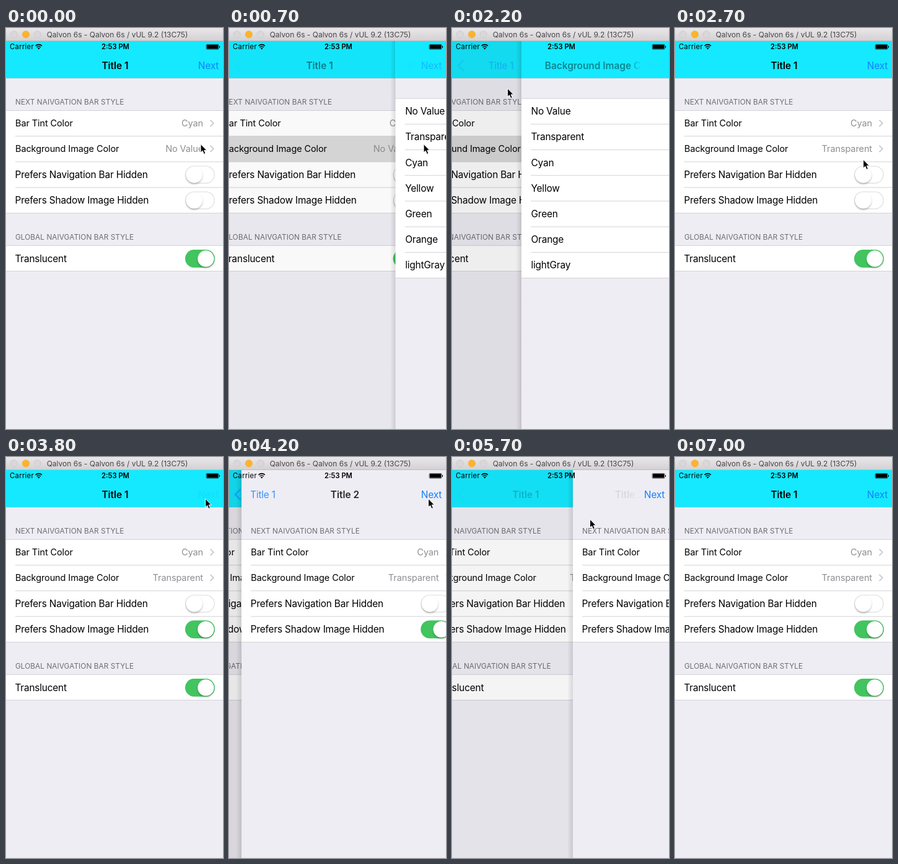
Write an HTML page that moves like this. It is 350 px wide and 644 px high and loops after 7100 ms.

```html
<!DOCTYPE html>
<html lang="en">
<head>
<meta charset="utf-8">
<title>Navigation bar demo</title>
<style>
html, body { margin: 0; width: 100%; height: 100%; overflow: hidden; background: #efedf4; }
svg { display: block; width: 350px; height: 644px; font-family: Inter, Roboto, sans-serif; }
text { white-space: pre; }
.body { font-size: 15.4px; letter-spacing: -.19px; }
.cell { font-size: 14.5px; letter-spacing: -.1px; }
.bold { font-size: 15.4px; font-weight: 600; letter-spacing: .01px; }
.head { font-size: 11.8px; letter-spacing: .06px; fill: #6d6d72; }
.gray { fill: #8e8e93; }
.blue { fill: #1182ff; }
.mid { text-anchor: middle; }
.end { text-anchor: end; }
</style>
</head>
<body>
<svg id="stage" viewBox="0 0 350 644" xmlns="http://www.w3.org/2000/svg">
  <defs>
    <linearGradient id="chrome" x2="0" y2="1">
      <stop stop-color="#e9e7e9"/><stop offset="1" stop-color="#d3d1d3"/>
    </linearGradient>
    <linearGradient id="edge">
      <stop stop-opacity="0"/><stop offset="1" stop-opacity=".12"/>
    </linearGradient>
    <linearGradient id="fade" gradientUnits="userSpaceOnUse" x1="285" x2="305">
      <stop stop-color="#fff"/><stop offset="1" stop-color="#000"/>
    </linearGradient>
    <mask id="titleMask" maskUnits="userSpaceOnUse" x="0" y="21" width="350" height="60">
      <rect y="21" width="350" height="60" fill="url(#fade)"/>
    </mask>
    <filter id="drop" x="-30%" y="-30%" width="160%" height="170%">
      <feDropShadow dx="0" dy="2" stdDeviation="1.6" flood-opacity=".28"/>
    </filter>
  </defs>
  <g id="main"></g>
  <rect id="dim" y="21" width="350" height="623"/>
  <g id="list"></g>
  <g id="two"></g>
  <g id="nav"></g>
  <g id="chromeBar"></g>
  <path id="cursor" d="M0 0V13.6L3.1 10.8 5.3 16 7.8 14.9 5.6 9.9H9.8Z" stroke="#fff" stroke-width="1" stroke-linejoin="round"/>
</svg>
<script>
const LOOP = 7100, STEP = 100, ROW = 41.2;
const $ = id => document.getElementById(id);
const set = (id, name, value) => $(id).setAttribute(name, value);
const alpha = (id, value) => set(id, 'opacity', value);
const shift = (id, x, y = 0) => set(id, 'transform', `translate(${x} ${y})`);

const text = (x, y, cls, str, extra = '') => `<text x="${x}" y="${y}" class="${cls}" ${extra}>${str}</text>`;
const rect = (x, y, w, h, fill, extra = '') =>
  `<rect x="${x}" y="${y}" width="${w}" height="${h}" fill="${fill}" ${extra}/>`;
const line = (x, y) => rect(x, y - .5, 350 - x, 1, '#d3d2d6');

// White block of rows with full outer lines and inset inner ones
function group(y, count, under = '') {
  let out = rect(0, y, 350, ROW * count, '#fff') + under;
  for (let i = 0; i <= count; i++) out += line(i % count ? 15 : 0, y + i * ROW);
  return out;
}

const cyanBar = rect(0, 21, 350, 59.5, '#14e9ff') + rect(0, 80.4, 350, .6, '#000', 'opacity=".2"');
const page = cyan => rect(0, 21, 350, 623, '#efedf4') + (cyan ? cyanBar : '');
const shadow = rect(-9, 21, 9, 623, 'url(#edge)');

function toggle(id, cy) {
  return `<g transform="translate(289 ${cy - 14.3})">
    <rect x=".7" y=".7" width="46.4" height="27.4" rx="13.7" fill="#fff" stroke="#e3e3e5" stroke-width="1.4"/>
    <rect id="${id}Fill" width="47.8" height="28.8" rx="14.4" fill="#42c45f"/>
    <circle id="${id}Knob" cx="14.5" cy="14.4" r="13.1" fill="#fff" filter="url(#drop)"/></g>`;
}

function valueRow(y, label, value, id) {
  return text(15, y + 5.2, 'cell', label) +
    text(318, y + 5.2, 'cell gray end', value, `id="${id}"`) +
    `<path d="M329.5 ${y - 5.2}l5.2 5.2-5.2 5.2" fill="none" stroke="#c7c7cc" stroke-width="1.7"/>`;
}

function settings(id, under) {
  return text(15, 123, 'head', 'NEXT NAIVGATION BAR STYLE') +
    group(132.5, 4, under) +
    valueRow(153, 'Bar Tint Color', 'Cyan', id + 'Tint') +
    valueRow(194, 'Background Image Color', 'Transparent', id + 'Image') +
    text(14.5, 240.8, 'body', 'Prefers Navigation Bar Hidden') +
    text(14.5, 282, 'body', 'Prefers Shadow Image Hidden') +
    toggle(id + 'Bar', 235.5) + toggle(id + 'Line', 276.7);
}

const pressed = (id, y) => rect(0, y, 350, ROW, '#d9d9d9', `id="${id}"`);

$('main').innerHTML = page(true) + settings('a', pressed('rowHit', 132.5 + ROW)) +
  text(15, 340.3, 'head', 'GLOBAL NAIVGATION BAR STYLE') + group(349.3, 1) +
  text(14.5, 375.5, 'body', 'Translucent') + toggle('glass', 370.3);

const colors = ['No Value', 'Transparent', 'Cyan', 'Yellow', 'Green', 'Orange', 'lightGray'];
$('list').innerHTML = shadow + page(true) + group(113.2, 7, pressed('pickHit', 113.2 + ROW)) +
  colors.map((c, i) => text(15.5, 139.2 + i * ROW, 'body', c)).join('') +
  '<path id="check" d="M323.2 134l3.6 3.6 7.6-7.8" fill="none" stroke="#1182ff" stroke-width="1.9"/>';

$('two').innerHTML = shadow + page(false) + settings('b', '');

$('nav').innerHTML =
  '<path id="back" d="M18.8 51.4L10 60.2l8.8 8.8" fill="none" stroke="#1182ff" stroke-width="2.5"/>' +
  text(0, 65.6, 'body blue mid', 'Title 1', 'id="backLabel"') +
  text(0, 65.6, 'bold mid', 'Title 1', 'id="baseTitle"') +
  `<g mask="url(#titleMask)">${text(0, 65.6, 'bold mid', '', 'id="topTitle"')}</g>` +
  text(343, 65.6, 'body blue end', 'Next', 'id="next"');

$('chromeBar').innerHTML = rect(0, 0, 350, 20.5, 'url(#chrome)') + rect(0, 20, 350, .8, '#b9b7b9') +
  [['#d9d7d9', '#cac8ca', 12.8], ['#fdb32d', '#f3ab32', 32], ['#d9d7d9', '#cac8ca', 50.7]]
    .map(([f, s, x]) => `<circle cx="${x}" cy="10.3" r="5.6" fill="${f}" stroke="${s}" stroke-width=".8"/>`).join('') +
  text(179.5, 15, 'mid', 'Qalvon 6s - Qalvon 6s / vUL 9.2 (13C75)', 'font-size="12" fill="#474547"') +
  text(6, 34.3, '', 'Carrier', 'font-size="11.4" letter-spacing=".25"') +
  text(176.5, 34.3, 'mid', '2:53 PM', 'font-size="11.2" font-weight="600"') +
  `<g fill="none" stroke="#000" stroke-width="1.6"><path d="M47.6 28.8a7.4 7.4 0 0 1 10.4 0"/>
   <path d="M49.6 31a4.6 4.6 0 0 1 6.4 0"/></g><path d="M52.8 34.6l-1.9-2a2.8 2.8 0 0 1 3.8 0Z"/>` +
  rect(323, 26.4, 20, 7.8, 'none', 'rx="1.4" stroke="#000" stroke-opacity=".75" stroke-width=".8"') +
  rect(323.8, 27.1, 18.4, 6.4, '#000') + rect(343.8, 28.8, 1.2, 3, '#000', 'rx=".6"');

// Linear interpolation through [time, ...values]
function track(t, keys) {
  let i = 1;
  while (i < keys.length - 1 && t > keys[i][0]) i++;
  const [t0, ...a] = keys[i - 1], [t1, ...b] = keys[i];
  const k = Math.min(1, Math.max(0, (t - t0) / (t1 - t0)));
  return a.map((v, n) => v + (b[n] - v) * k);
}

// Critically damped settle from 1 to 0
function spring(ms) {
  if (ms <= 0) return 1;
  const x = ms * .01826, v = (1 + x) * Math.exp(-x);
  return v < .0005 ? 0 : v;
}

const swipeList = [[1950, 0], [2100, .08], [2200, .32], [2300, .7], [2400, .97], [2500, 1]];
const swipeTwo = [[5400, 0], [5500, .1], [5600, .3], [5700, .557], [5800, .8], [5900, .94], [6100, 1]];
const pointer = [
  [0, 314, 186.5], [700, 314, 186.5], [1100, 309.5, 175.5], [1500, 309.5, 175.5], [1900, 4, 96], [2000, 12, 96],
  [2100, 42, 97], [2200, 89.5, 97], [2300, 190, 98], [2400, 262, 102], [2600, 298, 180], [2900, 315, 274],
  [3200, 315, 274], [3600, 321.5, 67], [4300, 321.5, 67], [4900, 180, 84], [5300, 74.5, 99], [5400, 24, 100],
  [5500, 60, 100], [5600, 130, 100], [5700, 222.5, 100], [5800, 305, 100], [5900, 362, 100]
];

// How far the top page stands to the right: 0 covers, 1 is away
function away(t) {
  if (t < 1900) return spring(t - 650);
  if (t < 3900) return track(t, swipeList)[0];
  if (t < 5400) return spring(t - 3950);
  return track(t, swipeTwo)[0];
}

function setToggle(id, on) {
  alpha(id + 'Fill', on);
  set(id + 'Knob', 'cx', 14.5 + 18.8 * on);
}

function drawNav(t, p, isList) {
  const out = (1 - p) ** 3, inn = p ** 3;
  alpha('back', .1 * (1 - p) + .9 * (1 - p) ** 8);
  shift('backLabel', 47 + 129 * p);
  alpha('backLabel', out);
  shift('baseTitle', 47 + 129 * p);
  alpha('baseTitle', inn);
  $('topTitle').textContent = isList ? 'Background Image Color' : 'Title 2';
  shift('topTitle', 175.5 + (isList ? 266 : 198) * p);
  alpha('topTitle', out);
  const tap = track(t, [[3600, 1], [3700, .12], [3900, .12], [4100, 1]])[0];
  alpha('next', isList ? inn : tap);
}

function draw(t) {
  const p = away(t), isList = t < 3300;
  shift('main', -105 * (1 - p));
  alpha('dim', .1 * (1 - p));
  shift('list', isList ? 350 * p : 400);
  shift('two', isList ? 400 : 350 * p);
  alpha('list', isList && p < 1 ? 1 : 0);
  alpha('two', !isList && p < 1 ? 1 : 0);
  // The bar trails the finger slightly in the quick swipe
  drawNav(t, isList && t > 1900 ? away(t - 30) : p, isList);

  alpha('rowHit', t < 500 ? 0 : track(t, [[2300, 1], [2700, 0]])[0]);
  alpha('pickHit', t < 1300 ? 0 : track(t, [[1400, 1], [1700, 0]])[0]);
  shift('check', 0, t < 1400 ? 0 : ROW);
  $('aImage').textContent = t < 1400 ? 'No Value' : 'Transparent';
  setToggle('aLine', track(t, [[3000, 0], [3200, 1]])[0]);
  shift('cursor', ...track(t, pointer));
}

['aBar', 'bBar'].forEach(id => setToggle(id, 0));
['glass', 'bLine'].forEach(id => setToggle(id, 1));

const start = performance.now();
function tick() {
  const t = (performance.now() - start) % LOOP;
  draw(Math.floor(t / STEP) * STEP);
  requestAnimationFrame(tick);
}
tick();
</script>
</body>
</html>
```
